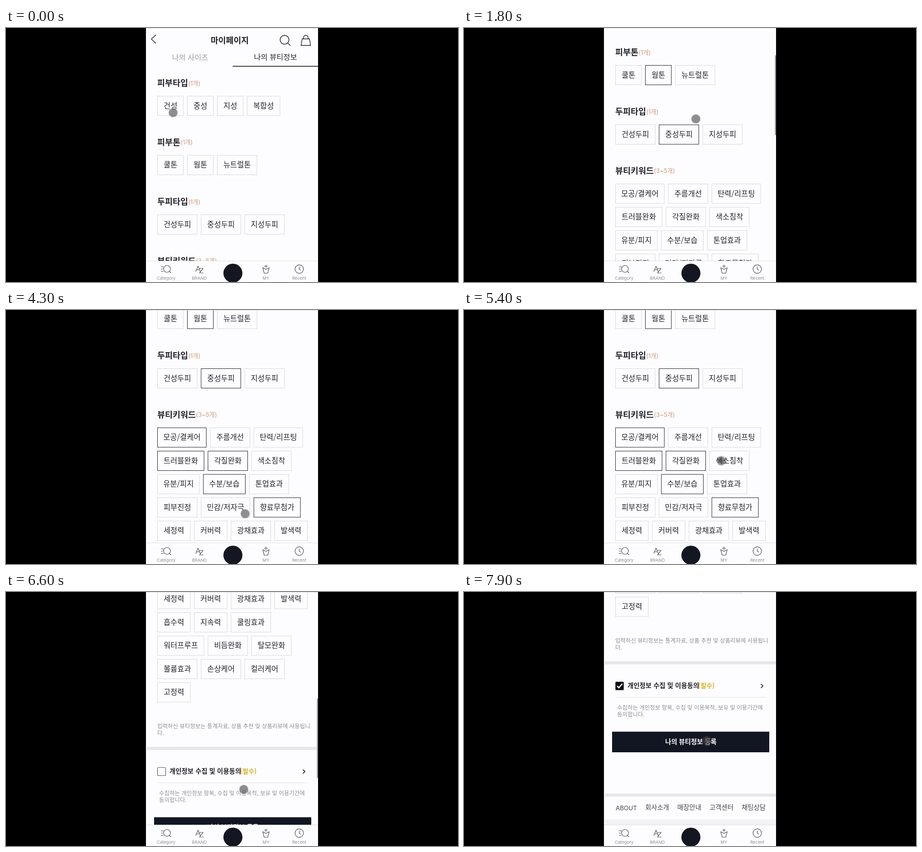
An HTML page that plays this animation: 998x561 px, repeating every 8000 ms.

```html
<!DOCTYPE html>
<html lang="ko">
<head>
<meta charset="utf-8">
<title>마이페이지</title>
<style>
  html, body { margin: 0; width: 100%; height: 100%; overflow: hidden; background: #000; }
  svg { display: block; width: 100vw; height: 100vh; }
  text { font-family: "Noto Sans CJK KR", "Noto Sans CJK", sans-serif; fill: #24232a; white-space: pre; }
  .latin { font-family: Inter, "Noto Sans CJK KR", "Noto Sans CJK", sans-serif; }
  .line { fill: none; stroke: #17161c; stroke-width: 1.4; }
  .thin { fill: none; stroke: #4a494f; stroke-width: 1.2; }
</style>
</head>
<body>
<svg id="stage" viewBox="0 0 998 561">
  <defs>
    <clipPath id="phone"><rect x="309" width="380" height="561"/></clipPath>
    <radialGradient id="press">
      <stop offset=".3" stop-color="#3c3838" stop-opacity=".7"/>
      <stop offset=".7" stop-color="#464242" stop-opacity=".55"/>
      <stop offset="1" stop-color="#646060" stop-opacity="0"/>
    </radialGradient>
  </defs>
  <g clip-path="url(#phone)">
    <rect x="309" width="380" height="561" fill="#fdfdff"/>
    <g id="page">
      <path class="line" d="M331 15L321 24.500L331 34"/>
      <g class="line">
        <circle cx="615" cy="26" r="9.800"/>
        <path d="M622 33L628 39M654 24H670L672.500 38.500H651.500ZM657 24V21a5 5 0 0 1 10 0V24"/>
      </g>
      <rect x="500.500" y="83.700" width="188.500" height="1.700" fill="#17161c"/>
      <path d="M311 1097H689V1104H311ZM311 1389H689V1396H311Z" fill="#e7e6eb"/>
      <rect x="311" y="1446" width="378" height="160" fill="#f3f2f7"/>
      <path d="M334 1176.500H667" stroke="#e3e1e2"/>
      <rect id="box" x="334.500" y="1142.500" width="18" height="18" rx="2" stroke="#55545c" stroke-width="1.200"/>
      <path id="tick" d="M338 1151.500L342 1155.500L349.500 1146.500" fill="none" stroke="#fff" stroke-width="2.600"/>
      <path d="M655.500 1147L660 1151.500L655.500 1156" fill="none" stroke="#17161c" stroke-width="1.700"/>
      <rect x="327" y="1252.500" width="347" height="45.500" fill="#121622"/>
    </g>
    <rect id="thumb" x="686.500" width="2.500" height="176" rx="1.200" fill="#96959b"/>
    <path d="M309 .5H689" stroke="#dcdadb"/>
    <g id="nav">
      <rect x="309" y="514" width="380" height="47" fill="#fdfdff"/>
      <path d="M309 514.500H689" stroke="#e2dddd"/>
      <g class="thin">
        <path d="M342 527.500H348M342 532.500H346.500M342 537.500H348M360.500 537.500L364.500 541"/>
        <circle cx="355.500" cy="532" r="7.500"/>
        <path d="M419 538L424 526L429 538M421 534H427M427 531H435L427.500 541H436"/>
        <circle cx="574" cy="526" r="2"/>
        <path d="M567 529.500L570 541.500H578L581 529.500L574 533Z"/>
        <circle cx="647.500" cy="532.500" r="9.300"/>
        <path d="M647.500 527V533L651 535"/>
      </g>
      <circle cx="501" cy="541.500" r="21" fill="#141722"/>
    </g>
  </g>
  <g id="pointer">
    <circle id="idle" r="9.500" fill="#464141" fill-opacity=".6" stroke="#a8a3a3" stroke-opacity=".6" stroke-width="2"/>
    <circle id="pressed" r="12" fill="url(#press)"/>
  </g>
</svg>
<script>
const $ = id => document.getElementById(id);
const page = $('page'), nav = $('nav');

function add(parent, tag, attrs, label) {
  const el = document.createElementNS('http://www.w3.org/2000/svg', tag);
  for (const key in attrs) el.setAttribute(key, attrs[key]);
  if (label) el.textContent = label;
  parent.append(el);
  return el;
}

// y is the vertical middle of the glyphs
function write(parent, label, x, y, size, attrs = {}) {
  return add(parent, 'text', { x, y: y + size * .38, 'font-size': size, ...attrs }, label);
}

const fill = color => ({ style: `fill:${color}` });
const bold = { 'font-weight': 700 };
const middle = { 'text-anchor': 'middle' };

write(page, '마이페이지', 494, 27, 18.3, { ...bold, ...middle });
write(page, '나의 사이즈', 406.5, 64.5, 16.4, { ...middle, ...fill('#9b9a9f') });
write(page, '나의 뷰티정보', 595, 64, 16.4, middle);

const borders = {};
function chipRow(labels, top) {
  let x = 334;
  for (const label of labels.split(' ')) {
    const slashes = label.split('/').length - 1;
    const width = 28 + 15.15 * (label.length - slashes) + 5 * slashes;
    borders[label] = add(page, 'rect', { x: x + .5, y: top + .5, width: width - 1, height: 43, fill: 'none' });
    write(page, label, x + width / 2, top + 21.5, 16.5, middle);
    x += width + 7.7;
  }
}

function section(title, count, y, rows) {
  write(page, title, 334, y, 18.5, bold);
  write(page, count, 334 + title.length * 17.05, y + .5, 13.2, { class: 'latin', ...fill('#d09a7e') });
  rows.forEach((row, i) => chipRow(row, y + 29 + i * 51.5));
}

section('피부타입', '(1개)', 121, ['건성 중성 지성 복합성']);
section('피부톤', '(1개)', 251.7, ['쿨톤 웜톤 뉴트럴톤']);
section('두피타입', '(1개)', 383, ['건성두피 중성두피 지성두피']);
section('뷰티키워드', '(3~5개)', 513.6, [
  '모공/결케어 주름개선 탄력/리프팅', '트러블완화 각질완화 색소침착',
  '유분/피지 수분/보습 톤업효과', '피부진정 민감/저자극 향료무첨가',
  '세정력 커버력 광채효과 발색력', '흡수력 지속력 쿨링효과',
  '워터프루프 비듬완화 탈모완화', '볼륨효과 손상케어 컬러케어', '고정력'
]);

const gray = fill('#8f8e93');
write(page, '입력하신 뷰티정보는 통계자료, 상품 추천 및 상품리뷰에 사용됩니', 334, 1051, 12.47, gray);
write(page, '다.', 334, 1066, 12.47, gray);
write(page, '개인정보 수집 및 이용동의', 361, 1151, 14.45, bold);
write(page, '(필수)', 517, 1151, 14, { ...bold, ...fill('#dcae28') });
write(page, '수집하는 개인정보 항목, 수집 및 이용목적, 보유 및 이용기간에', 338, 1199, 12.47, gray);
write(page, '동의합니다.', 338, 1214.3, 12.47, gray);
write(page, '나의 뷰티정보 등록', 501, 1275, 14.35, { ...bold, ...middle, ...fill('#fff') });
write(page, 'ABOUT', 335, 1420.5, 13.4, { class: 'latin', ...fill('#46454b') });
['회사소개', '매장안내', '고객센터', '채팅상담'].forEach((label, i) =>
  write(page, label, 400 + i * 71, 1420, 14.4, fill('#46454b')));
[['Category', 353.5], ['BRAND', 427], ['MY', 574], ['Recent', 647.5]].forEach(([label, x]) =>
  write(nav, label, x, 552.8, 9.5, { class: 'latin', ...middle, ...gray }));

const LOOP = 8000, CHECKED = 7400;
const taps = {
  '건성': 200, '웜톤': 850, '중성두피': 1350, '모공/결케어': 2300, '트러블완화': 2650,
  '각질완화': 3050, '수분/보습': 3500, '향료무첨가': 3900
};
const pressTimes = [...Object.values(taps).slice(2), 5450, CHECKED, 7900];

// time, x, y
const pointerPath = [
  [0, 369, 187], [450, 369, 187], [800, 435, 312], [950, 436, 312], [1200, 510, 455],
  [1450, 511, 452], [1850, 512, 190], [2250, 400, 285], [2350, 400, 285], [2600, 416, 335],
  [2750, 416, 335], [3000, 490, 335], [3150, 490, 335], [3450, 488, 388], [3600, 488, 388],
  [3850, 592, 440], [4050, 592, 440], [4300, 528, 450], [4750, 528, 448], [5350, 568, 333],
  [5450, 568, 333], [5800, 570, 130], [6150, 552, 260], [6600, 525, 436], [6950, 525, 247],
  [7300, 343, 207], [7500, 343, 207], [7850, 536, 329]
];
// time, offset
const scrollPath = [[1450, 0], [2000, 283], [5450, 283], [6400, 755], [6620, 755], [7050, 944]];

function along(path, t) {
  const next = path.findIndex(key => key[0] > t);
  if (next < 0) return path.at(-1).slice(1);
  if (next === 0) return path[0].slice(1);
  const a = path[next - 1], b = path[next];
  const u = (t - a[0]) / (b[0] - a[0]), eased = u * u * (3 - 2 * u);
  return a.slice(1).map((v, i) => v + (b[i + 1] - v) * eased);
}

function barOpacity(t) {
  return Math.max(...[[1450, 2000], [5450, 7050]].map(([from, to]) =>
    t < from ? 0 : Math.min(1, Math.max(0, 1 - (t - to - 150) / 250))));
}

function draw(now) {
  const t = now % LOOP;
  const [offset] = along(scrollPath, t);
  const [x, y] = along(pointerPath, t);
  page.setAttribute('transform', `translate(0 ${-offset})`);
  $('pointer').setAttribute('transform', `translate(${x} ${y})`);
  $('thumb').setAttribute('y', offset * .3138 - 2);
  $('thumb').setAttribute('opacity', barOpacity(t));

  const down = pressTimes.some(time => Math.abs(t - time) <= 100);
  $('pressed').setAttribute('opacity', down ? 1 : 0);
  $('idle').setAttribute('opacity', down ? 0 : 1);

  for (const label in borders)
    borders[label].setAttribute('stroke', t >= taps[label] ? '#1b1a24' : '#d6d4de');
  const checked = t >= CHECKED;
  $('box').setAttribute('fill', checked ? '#0c0b10' : '#fdfdff');
  $('tick').setAttribute('opacity', checked ? 1 : 0);
  requestAnimationFrame(draw);
}
requestAnimationFrame(draw);
</script>
</body>
</html>
```
